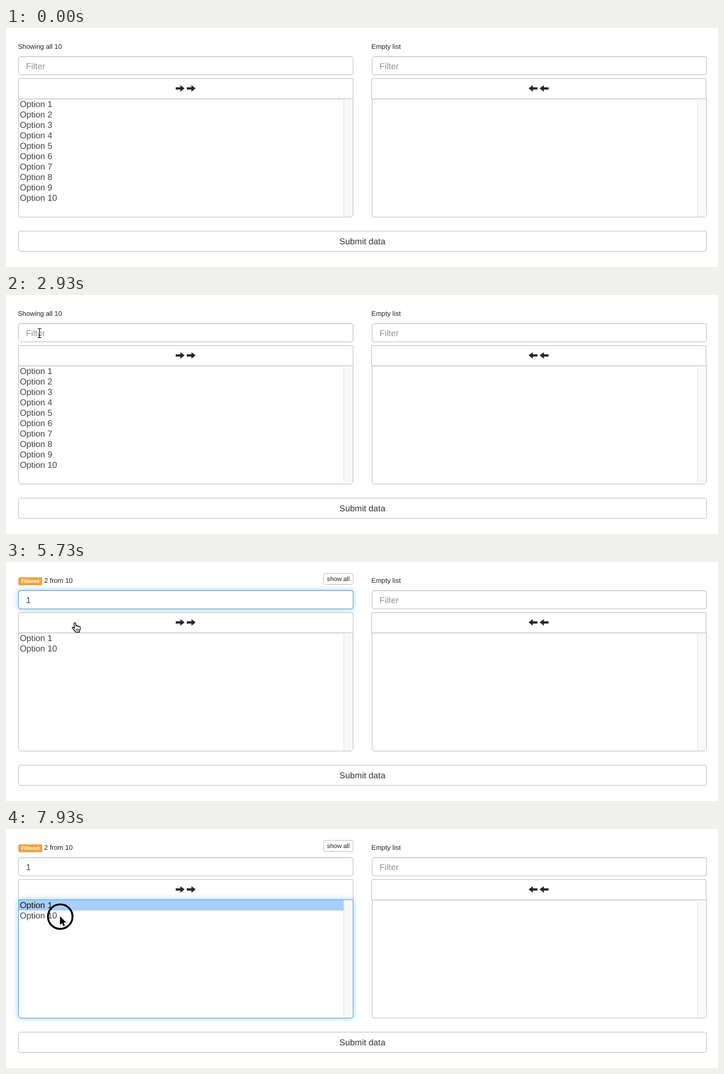
An HTML page for the animation above (8 s loop, 1158x390 px).

```html
<!DOCTYPE html>
<html lang="en">
<head>
<meta charset="utf-8">
<title>Dual list filter</title>
<style>
html, body { margin: 0; width: 100%; height: 100%; overflow: hidden; background: #fff; }
.box { position: absolute; box-sizing: border-box; border: 1px solid #c3c3c3; background: #fff; }
.input { top: 46px; width: 545px; height: 31px; border-radius: 4px; box-shadow: inset 0 1px 1px rgba(0,0,0,.075); }
.move { top: 82px; width: 545px; height: 34px; border-radius: 2px 2px 0 0; }
.list { top: 115px; width: 545px; height: 194px; border-radius: 0 0 4px 4px; box-shadow: inset 0 1px 1px rgba(0,0,0,.075); }
.list i { position: absolute; right: 0; top: 0; width: 14px; height: 100%; background: #f8f8f8; border-left: 1px solid #e6e6e6; }
.glow { border-color: #58a6e8; background: none; box-shadow: 0 0 8px rgba(102,175,233,.65); opacity: 0; }
#submit { left: 20px; top: 331px; width: 1120px; height: 34px; border-radius: 4px; }
#showAll { left: 516px; top: 18px; width: 49px; height: 19px; border-radius: 3px; }
svg { position: absolute; left: 0; top: 0; }
text { font: 14px "Liberation Sans", Arial, sans-serif; fill: #333; text-rendering: geometricPrecision; white-space: pre; }
.small { font-size: 11px; fill: #222; }
.hint { fill: #949494; }
.opt { fill: #444; }
</style>
</head>
<body>
<div class="box input" style="left:20px"></div>
<div class="box input" style="left:595px"></div>
<div class="box move" style="left:20px"></div>
<div class="box move" style="left:594px"></div>
<div class="box list" style="left:20px"><i></i></div>
<div class="box list" style="left:595px"><i></i></div>
<div class="box input glow" id="inputGlow" style="left:20px"></div>
<div class="box list glow" id="listGlow" style="left:20px"></div>
<div class="box" id="submit"></div>
<div class="box" id="showAll"></div>

<svg width="1158" height="390" viewBox="0 0 1158 390">
  <defs>
    <path id="right" d="M0 -1.8H7.6V-5.4L14.4 0L7.6 5.4V1.8H0Z" fill="#262626"/>
  </defs>
  <use href="#right" x="276" y="98.6"/>
  <use href="#right" x="294" y="98.6"/>
  <use href="#right" transform="translate(864.4 98.6) scale(-1 1)"/>
  <use href="#right" transform="translate(882.4 98.6) scale(-1 1)"/>

  <text class="small" id="all" x="19.5" y="34">Showing all 10</text>
  <g id="filtered">
    <rect x="20" y="25" width="39" height="13" rx="2.5" fill="#eea543"/>
    <text x="39.5" y="34" text-anchor="middle" style="font-size:8.1px;font-weight:bold;fill:#fff">Filtered</text>
    <text class="small" x="62" y="34">2 from 10</text>
    <text class="small" x="540.5" y="31" text-anchor="middle" style="font-size:10.2px">show all</text>
  </g>
  <text class="small" x="594.3" y="34">Empty list</text>
  <text class="hint" id="hint" x="32.5" y="67">Filter</text>
  <text class="opt" id="typed" x="32.5" y="67">1</text>
  <text class="hint" x="607.5" y="67">Filter</text>
  <text x="579.7" y="353" text-anchor="middle">Submit data</text>

  <rect id="selection" x="21" y="116" width="528" height="17" fill="#a8cfff"/>
  <g id="options"></g>
  <rect id="caret" y="54" width="1" height="16" fill="#222"/>

  <circle id="ring" r="20" fill="none" stroke="#000" stroke-width="3"/>
  <g id="cursor">
    <g id="arrow">
      <path d="M0 0V14.2L3.3 11.2L5.5 16.3L8 15.2L5.8 10.2H10Z" transform="translate(.4 1.2)" fill="none" stroke="#000" stroke-opacity=".13" stroke-width="2.6"/>
      <path d="M0 0V14.2L3.3 11.2L5.5 16.3L8 15.2L5.8 10.2H10Z" fill="#000" stroke="#fff" stroke-width="1.8" paint-order="stroke"/>
    </g>
    <g id="beam" fill="none">
      <path id="beamLine" d="M-3.5 -7.5H-2Q-.5 -7.5 -.5 -6V6Q-.5 7.5 -2 7.5H-3.5M2.5 -7.5H1Q-.5 -7.5 -.5 -6M-.5 6Q-.5 7.5 1 7.5H2.5M-2.5 3.5H1.5" stroke="#fff" stroke-width="2.6"/>
      <use href="#beamLine"/>
      <path d="M-3.5 -7.5H-2Q-.5 -7.5 -.5 -6V6Q-.5 7.5 -2 7.5H-3.5M2.5 -7.5H1Q-.5 -7.5 -.5 -6M-.5 6Q-.5 7.5 1 7.5H2.5M-2.5 3.5H1.5" stroke="#111" stroke-width="1.1"/>
    </g>
    <g id="hand" transform="translate(-5 -1)" stroke="#000" stroke-width="1.2" stroke-linejoin="round">
      <path d="M4.9 10L3.8 2.7C3.5 .4 6 .1 6.4 2.2L7.2 6.4C7.6 5.1 9.4 5.4 9.6 6.9C10.2 5.9 11.7 6.2 11.9 7.5C12.7 6.9 14 7.4 14.1 8.8C14.3 11.4 13.5 12.6 12.8 14.2L12.6 16.2H6.2C5.5 14 2.9 12.3 1.2 9.8C.4 8.2 2.1 7.4 3.4 8.8Z" fill="#fff"/>
      <path d="M7.4 10.8V14M9.3 10.8V14M11.2 10.8V14" stroke-width=".9"/>
    </g>
  </g>
</svg>

<script>
const LOOP = 8000, STEP = 200 / 3;
const FOCUS = 2960, TYPE = 4060, FILTER = 4125, SELECT = 7330;
const $ = id => document.getElementById(id);
const show = (id, on) => { $(id).style.display = on ? '' : 'none'; };
const clamp = v => Math.max(0, Math.min(1, v));
const ramp = (t, from, to) => clamp((t - from) / (to - from));

// Pointer path: time, x, y
const path = [
  [130, 419, 352], [330, 345, 265], [530, 262, 170], [730, 203, 105], [930, 180, 82],
  [1400, 150, 74], [1800, 124, 66], [1930, 91.5, 62.8], [2130, 59, 61.5],
  [2600, 59, 61.5], [2870, 55, 62], [4540, 55, 62], [5000, 92, 71], [5400, 124, 83],
  [5730, 112, 99], [6070, 91, 119], [6270, 88, 126], [6600, 83, 138], [6930, 81, 141],
  [7130, 76, 127], [7530, 76, 127], [7800, 87.8, 142.2]
];

function pointAt(t) {
  const i = path.findIndex(p => p[0] > t);
  if (i === 0) return path[0].slice(1);
  if (i < 0) return path[path.length - 1].slice(1);
  const a = path[i - 1], b = path[i], k = ramp(t, a[0], b[0]);
  return [a[1] + (b[1] - a[1]) * k, a[2] + (b[2] - a[2]) * k];
}

function pointerKind(t, y) {
  if (t < 2900) return 'arrow';
  if (y < 77) return 'beam';
  return y >= 82 && y < 115 ? 'hand' : 'arrow';
}

function ringAlpha(t) {
  if (t < 3000) return (t < 2390 ? .6 : 1) * (t < 2325 ? 0 : 1 - ramp(t, 2560, 2880));
  if (t < 7600) return t < 7195 ? 0 : 1 - ramp(t, 7400, 7540);
  return t < 7860 ? 0 : 1;
}

function caretOn(t) {
  if (t < FOCUS || t > SELECT) return false;
  const since = t - (t < TYPE ? FOCUS : TYPE);
  return Math.floor(since / 500) % 2 === 0;
}

const options = Array.from({ length: 10 }, (_, i) => {
  const el = document.createElementNS('http://www.w3.org/2000/svg', 'text');
  el.setAttribute('class', 'opt');
  el.setAttribute('x', 22.4);
  el.textContent = 'Option ' + (i + 1);
  $('options').append(el);
  return el;
});

function render(t) {
  const filtered = t >= FILTER, selected = t >= SELECT;
  show('all', !filtered);
  show('filtered', filtered);
  show('showAll', filtered);
  show('hint', t < TYPE);
  show('typed', t >= TYPE);
  show('selection', selected);

  let row = 0;
  for (const el of options) {
    const visible = !filtered || el.textContent.includes('1');
    el.style.display = visible ? '' : 'none';
    if (visible) el.setAttribute('y', 129 + 17 * row++);
  }
  options[0].style.fill = selected ? '#111' : '';

  const blur = ramp(t, SELECT, SELECT + 150);
  $('inputGlow').style.opacity = ramp(t, FOCUS - 40, FOCUS + 150) * (1 - blur);
  $('listGlow').style.opacity = blur;

  show('caret', caretOn(t));
  $('caret').setAttribute('x', t < TYPE ? 33 : 40);

  const [x, y] = pointAt(t), kind = pointerKind(t, y);
  show('cursor', t >= 130);
  for (const id of ['arrow', 'beam', 'hand']) show(id, id === kind);
  $('cursor').setAttribute('transform', `translate(${x} ${y})`);
  $('ring').setAttribute('cx', x + .4);
  $('ring').setAttribute('cy', y + .8);
  $('ring').style.opacity = ringAlpha(t);
}

const start = performance.now();
function tick() {
  const t = (performance.now() - start) % LOOP;
  render(Math.floor((t + 5) / STEP) * STEP);
  requestAnimationFrame(tick);
}
tick();
</script>
</body>
</html>
```
